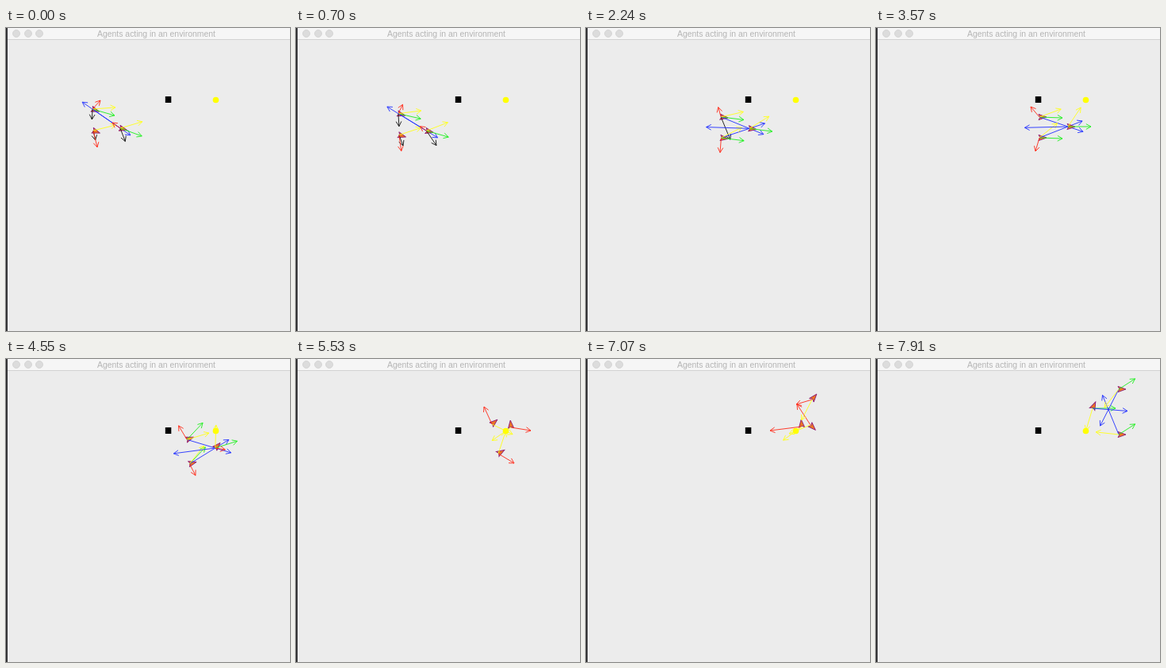
An HTML page with a canvas that plays this animation: 358 px wide and 381 px high, repeating every 8000 ms.

```html
<!DOCTYPE html>
<html lang="en">
<head>
<meta charset="utf-8">
<title>Agents</title>
<style>
  html, body { margin: 0; width: 100%; height: 100%; overflow: hidden; background: #ececec; }
  .bar {
    position: absolute; left: 0; top: 0; width: 358px; height: 14px;
    background: #f6f6f6; border-bottom: 1px solid #d2d2d2;
  }
  .edge { position: absolute; left: 0; top: 0; width: 2px; height: 100%; background: #343436; }
  .bar i {
    position: absolute; top: 2px; width: 10px; height: 10px; box-sizing: border-box;
    border-radius: 50%; background: #dcdcdc; border: 1px solid #d6d6d6;
  }
  .bar span {
    position: absolute; left: 115px; top: 1px; line-height: 14px; white-space: nowrap;
    font-family: "Liberation Sans", Arial, sans-serif; font-size: 10.43px; color: #b4b4b4;
  }
  canvas { position: absolute; left: 0; top: 0; width: 358px; height: 381px; }
</style>
</head>
<body>
<div class="bar">
  <i style="left:8px"></i><i style="left:23px"></i><i style="left:37px"></i>
  <span>Agents acting in an environment</span>
</div>
<div class="edge"></div>
<canvas></canvas>
<script>
const LOOP = 8000, TICK = 70, LAST = 73, SPEED = 3;
const GOAL = { x: 264.5, y: 90.5 }, BLOCK = { x: 204.5, y: 90 };
const FAR = 35.5, SPREAD = 101;   // flocking: pair distance, perimeter of the group

// Key poses of each agent: x, y, heading in degrees, wander dx, dy.
const KEYS = [0, 33, 51, 65, 73];
const PATHS = [
  [[109, 102, 20, 10, -11], [206, 112, 0, -11, -13], [247, 82, -40, -10, -22], [272, 85, -95, -40, 5], [273, 62, -65, 0, 0]],
  [[110, 129, 20, 5, 21], [206, 138, 0, -5, 17], [255, 119, -30, 20, 12], [283, 83, 45, -17, -26], [306, 95, 0, 0, 0]],
  [[144, 126, 16, -10, -7], [242, 124, 2, 0, 0], [271, 86, -95, 25, 4], [285, 51, -50, -20, 6], [306, 38, 0, 0, 0]]
];

const canvas = document.querySelector('canvas');
const ctx = canvas.getContext('2d');
const dpr = window.devicePixelRatio || 1;
canvas.width = 358 * dpr;
canvas.height = 381 * dpr;

const rad = d => d * Math.PI / 180;
const mix = (a, b, u) => a + (b - a) * u;
const dist = (p, q) => Math.hypot(q.x - p.x, q.y - p.y);
const aim = (p, q) => Math.atan2(q.y - p.y, q.x - p.x);
const stepTime = k => TICK * Math.floor(1.55 * k + (k > 45 ? 0.5 : 0) + 1e-6);

function stepAt(ms) {
  let k = 0;
  while (k < LAST && stepTime(k + 1) <= ms) k++;
  return k;
}

// Hermite path whose tangents follow the heading at constant speed.
function pose(path, k) {
  let i = 0;
  while (i < KEYS.length - 2 && KEYS[i + 1] <= k) i++;
  const span = KEYS[i + 1] - KEYS[i], u = (k - KEYS[i]) / span, reach = SPEED * span;
  const p = path[i], q = path[i + 1], a = rad(p[2]), b = rad(q[2]);
  const curve = (from, to, v, w) =>
    mix(from, to, u * u * (3 - 2 * u)) + reach * u * (1 - u) * ((1 - u) * v - u * w);
  return {
    x: curve(p[0], q[0], Math.cos(a), Math.cos(b)),
    y: curve(p[1], q[1], Math.sin(a), Math.sin(b)),
    angle: mix(a, b, u),
    wander: [mix(p[3], q[3], u), mix(p[4], q[4], u)]
  };
}

function arrow(p, dx, dy, color) {
  if (Math.hypot(dx, dy) < 5) return;
  const tx = p.x + dx, ty = p.y + dy, dir = Math.atan2(dy, dx);
  ctx.strokeStyle = color;
  ctx.beginPath();
  ctx.moveTo(p.x, p.y);
  ctx.lineTo(tx, ty);
  for (const side of [-0.5, 0.5]) {
    ctx.moveTo(tx, ty);
    ctx.lineTo(tx - 7 * Math.cos(dir + side), ty - 7 * Math.sin(dir + side));
  }
  ctx.stroke();
}

// Arrow along the mean of several unit vectors.
function pull(p, angles, size, color) {
  const mean = f => size * angles.reduce((sum, a) => sum + f(a), 0) / angles.length;
  if (angles.length) arrow(p, mean(Math.cos), mean(Math.sin), color);
}

function body(p) {
  ctx.save();
  ctx.translate(p.x, p.y);
  ctx.rotate(p.angle);
  ctx.beginPath();
  ctx.moveTo(9, 0);
  ctx.lineTo(-1, -3.6);
  ctx.lineTo(1, 0);
  ctx.lineTo(-1, 3.6);
  ctx.closePath();
  ctx.fillStyle = '#f07820';
  ctx.fill();
  ctx.strokeStyle = '#8c1c78';
  ctx.stroke();
  ctx.restore();
}

function drawAgent(p, others) {
  body(p);
  pull(p, others.map(q => q.angle), 29, '#1cf01c');
  pull(p, others.map(q => aim(p, q)), 58, '#2230ff');
  const toBlock = aim(p, BLOCK);
  if (Math.cos(toBlock - p.angle) > 0.5) {
    pull(p, [toBlock + rad(100)], 1250 / dist(p, BLOCK), '#111');
  }
  arrow(p, ...p.wander, '#ff2a18');
  pull(p, [aim(p, GOAL)], 29, '#ffff1a');
}

function draw(ms) {
  const k = stepAt(ms);
  const group = PATHS.map(path => pose(path, k));
  const perimeter = group.reduce((sum, p, i) => sum + dist(p, group[(i + 1) % group.length]), 0);

  ctx.setTransform(dpr, 0, 0, dpr, 0, 0);
  ctx.clearRect(0, 0, 358, 381);
  ctx.lineWidth = 0.9;
  for (const p of group) {
    drawAgent(p, group.filter(q => perimeter > SPREAD && dist(p, q) > FAR));
  }
  ctx.fillStyle = '#000';
  ctx.fillRect(BLOCK.x - 3.7, BLOCK.y - 4, 7.5, 8);
  ctx.fillStyle = '#ff0';
  ctx.beginPath();
  ctx.arc(GOAL.x, GOAL.y, 3.8, 0, 2 * Math.PI);
  ctx.fill();
}

const start = performance.now();
function loop() {
  draw((performance.now() - start) % LOOP);
  requestAnimationFrame(loop);
}
loop();
</script>
</body>
</html>
```
